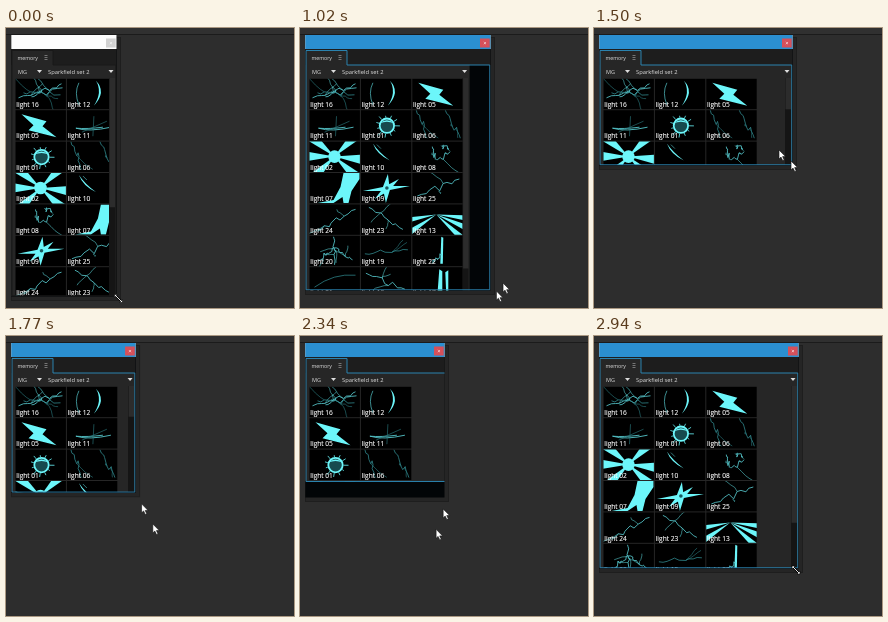
An HTML page that plays this animation: 288x280 px, repeating every 3.96 s.

```html
<!DOCTYPE html>
<html lang="en">
<head>
<meta charset="utf-8">
<title>Resizable memory panel</title>
<style>
html, body { margin: 0; width: 100%; height: 100%; overflow: hidden; background: #2d2d2d; }
svg { display: block; width: 288px; height: 280px; font-family: "Open Sans", "Noto Sans", sans-serif; }
.thumb { fill: #6cf6fa; stroke: none; }
.thumb .line { fill: none; stroke: #55c6ca; stroke-linejoin: round; }
.thumb .dim { stroke: #2d7f84; }
.thumb text { fill: #fff; stroke: #fff; stroke-width: .12; font-size: 6.6px; }
.ui text { fill: #e2e2e2; font-size: 5.8px; }
</style>
</head>
<body>
<svg viewBox="0 0 288 280">
  <defs>
    <clipPath id="windowClip"><rect id="windowBox" x="5.3" y="6"/></clipPath>
    <clipPath id="listClip"><rect id="listBox" x="6" y="38"/></clipPath>
    <clipPath id="cellClip"><rect width="50.4" height="30.4"/></clipPath>
    <path id="arrow" d="M0 0V9L2 7.1 3.7 10.6 5.2 9.9 3.6 6.6H6.5Z" fill="#fff" stroke="#111" stroke-width=".6"/>
    <g id="sizer">
      <path d="M-3-3L3 3" stroke="#000" stroke-width="2"/>
      <path d="M-4-4H-1L-4-1ZM4 4H1L4 1Z" fill="#fff" stroke="#000" stroke-width=".6"/>
      <path d="M-3-3L3 3" stroke="#fff" stroke-width=".9"/>
    </g>
  </defs>
  <rect width="288" height="280" fill="#2d2d2d"/>
  <rect width="288" height="6" fill="#303030"/>
  <rect y="6" width="288" height="1" fill="#1b1b1b"/>
  <rect id="shadow" x="5.5" y="9.5" fill="#252525" stroke="#1e1e1e"/>
  <g clip-path="url(#windowClip)">
    <rect x="5" y="7" width="283" height="273" fill="#020507"/>
    <g class="ui">
      <rect id="strip" x="5" y="21" height="16" fill="#1d1d1d"/>
      <rect id="body" x="5" y="37" fill="#262626"/>
      <rect x="6" y="22" width="41" height="15" fill="#262626"/>
      <text x="11.5" y="31.5" style="font-size:5.2px">memory</text>
      <path d="M38.5 27.5h3M38.5 29.5h3M38.5 31.5h3" stroke="#8a8a8a" stroke-width=".8"/>
      <text x="12" y="45.5" style="font-size:5.5px">MG</text>
      <path d="M31 42h5l-2.5 3Z" fill="#ddd"/>
      <text x="42" y="45.5">Sparkfield set 2</text>
      <path id="drop" d="M-2.5 42h5L0 45Z" fill="#ddd"/>
    </g>
    <g clip-path="url(#listClip)">
      <g id="cells"></g>
      <rect id="track" y="50" width="7" fill="#151515"/>
      <rect id="handle" y="50" width="6" fill="#2c2c2c"/>
    </g>
    <path id="outline" fill="none"/>
    <rect x="5" y="7" width="283" height="14" fill="#fdfdfd"/>
    <rect id="title" x="5" y="7" width="283" height="14" fill="#2b8fd0"/>
    <g id="close">
      <rect id="closeBox" x="-10" y="10.5" width="9.7" height="9"/>
      <path d="M-6.2 14l2.2 2.2m0-2.2l-2.2 2.2" stroke="#fff" stroke-width=".7" stroke-opacity=".8"/>
    </g>
  </g>
  <circle id="ring" cx="113" cy="269.5" fill="#a01818" fill-opacity=".18" stroke="#a82626"/>
  <use id="tail" href="#arrow"/>
  <use id="mouse" href="#arrow"/>
  <use id="grip" href="#sizer"/>
</svg>
<script>
const LOOP = 3960, STEP = 30, LAG = 60, REPAINT = 90;
const PITCH_X = 51.4, PITCH_Y = 31.4;
const el = id => document.getElementById(id);
const set = (id, attrs) => {
  for (const key in attrs) el(id).setAttribute(key, attrs[key]);
};
const clamp = v => Math.max(0, Math.min(1, v));

// Turning points of the pointer: time, x, y
const path = [
  [600, 113, 271], [800, 134, 270], [960, 193, 265], [1200, 220, 195],
  [1440, 201, 140], [1500, 185, 122], [1680, 130, 150], [1890, 201, 230],
  [1920, 231, 216], [2070, 248, 140], [2190, 185, 126], [2280, 147, 164],
  [2430, 128, 224], [2850, 207, 235]
];

function slope(i, axis) {
  if (i < 1 || i >= path.length - 1) return 0;
  const [a, b, c] = path.slice(i - 1, i + 2);
  const d = (b[axis] - a[axis]) / (b[0] - a[0]);
  const e = (c[axis] - b[axis]) / (c[0] - b[0]);
  return d * e > 0 ? 2 * d * e / (d + e) : 0;
}

// Monotone cubic interpolation keeps the path free of overshoot.
function pointer(t) {
  const last = path.length - 1;
  if (t <= path[0][0]) return path[0].slice(1);
  if (t >= path[last][0]) return path[last].slice(1);
  const i = path.findIndex(p => p[0] > t) - 1;
  const p = path[i], q = path[i + 1], h = q[0] - p[0], s = (t - p[0]) / h;
  return [1, 2].map(k =>
    p[k] * (1 + 2 * s) * (1 - s) ** 2 + q[k] * s * s * (3 - 2 * s) +
    h * (slope(i, k) * s * (1 - s) ** 2 - slope(i + 1, k) * s * s * (1 - s)));
}
const corner = t => pointer(t).map(v => v - 3);

const line = (d, width = .8, kind = "") =>
  `<path class="line ${kind}" stroke-width="${width}" d="${d}"/>`;
const shape = d => `<path d="${d}"/>`;

function random(seed) {
  let n = seed * 7919 + 17;
  return () => (n = (n * 16807) % 2147483647) / 2147483647;
}

// A jagged main stroke with thinner side branches.
function bolt(seed, x0, y0, x1, y1, branches = 2, kind = "") {
  const rnd = random(seed), count = 10, points = [];
  const swing = size => (rnd() - .5) * size;
  rnd();
  for (let i = 0; i <= count; i++) {
    const s = i / count, ease = Math.sin(Math.PI * s);
    points.push([x0 + (x1 - x0) * s + swing(4) * ease, y0 + (y1 - y0) * s + swing(7) * ease]);
  }
  let twigs = "";
  for (let i = 0; i < branches; i++) {
    let [x, y] = points[2 + Math.floor(rnd() * 6)];
    const dx = swing(8), dy = swing(8);
    twigs += `M${x} ${y}`;
    for (let j = 0; j < 4; j++) twigs += `L${x += dx + swing(3)} ${y += dy + swing(3)}`;
  }
  return line("M" + points.join("L"), .85, kind) + line(twigs, .6, kind);
}

function rays(cx, cy, angles, spread) {
  return angles.map(a => {
    const at = b => `${cx + 50 * Math.cos(b)} ${cy + 50 * Math.sin(b)}`;
    return shape(`M${cx} ${cy}L${at(a - spread)}L${at(a + spread)}Z`);
  }).join("");
}

function eye() {
  let lashes = "";
  for (let i = 0; i < 11; i++) {
    const a = i * Math.PI / 5.5 - 1.7, r = 10 + i * 5 % 4;
    const at = d => `${26 + d * Math.cos(a)} ${15.5 + d * Math.sin(a)}`;
    lashes += `M${at(8)}L${at(r)}`;
  }
  return line(lashes, 1) +
    '<circle cx="26" cy="15.5" r="7.2" fill="#174a4e" stroke="#6cf6fa" stroke-width="1.8"/>' +
    shape("M19 13Q26 7 33 13Q26 10 19 13Z");
}

const art = {
  "16": bolt(3, 3, 19, 47, 9) + bolt(8, 8, 14, 45, 16, 3, "dim") + bolt(5, 16, 18, 46, 5, 3),
  "12": line("M12 4Q7 14 12 26", .7) + shape("M29 2Q40 13 27 27Q36 13 29 2Z"),
  "05": shape("M6 4L31 11 27 16 41 27 13 20 18 15Z"),
  "11": line("M9 18Q22 22 44 17M9 18Q20 19 36 17", .9) + line("M27 6L26 26M15 22L40 11", .6, "dim"),
  "01": eye(),
  "06": bolt(12, 4, 0, 15, 28, 1, "dim") + bolt(14, 33, 0, 48, 28, 2, "dim"),
  "02": rays(25, 15, [.1, .75, 2.35, 3.15, 3.85, 5.5], .17) + '<circle cx="25" cy="15" r="6.3"/>',
  "10": shape("M12 2Q16 13 29 19Q18 11 12 2Z") + line("M16 3L20 7", .6),
  "08": bolt(14, 20, 5, 23, 18, 1) + bolt(12, 24, 18, 38, 10, 1) + bolt(17, 29, 4, 37, 9, 0),
  "07": shape("M8 30L24 27 31 14 34 0H50V6L42 18 39 30H34L33 24 24 30Z"),
  "09": shape("M2 18L22 14 27 1 28.5 13 49 13 29 17 25 30 22.5 18ZM14 26L23 14 38 6 29 17Z") +
    '<circle cx="26" cy="15" r="1.8" fill="#17585d"/>',
  "25": bolt(31, 5, 23, 47, 6),
  "24": bolt(41, 8, 27, 46, 5),
  "23": bolt(51, 8, 3, 42, 25, 3),
  "13": rays(24, 10, [.12, .42, .75, 2.55, 2.95], .09),
  "20": bolt(61, 24, 1, 25, 29, 4) + bolt(63, 25, 12, 43, 24, 1) + bolt(64, 25, 12, 9, 25, 1),
  "19": bolt(71, 4, 18, 47, 14, 2, "dim"),
  "22": shape("M29 1L31 2 30.5 28H28Z") + bolt(81, 29, 18, 20, 27, 0),
  "21": line("M5 20Q24 6 46 8", .8, "dim"),
  "18": bolt(91, 5, 6, 44, 22, 3),
  "17": shape("M27 2L30 4V29H25ZM33 5L36 3V29H34Z"),
  "15": bolt(95, 8, 5, 42, 23),
  "14": bolt(97, 5, 22, 44, 5),
  "04": bolt(99, 24, 2, 30, 28)
};
const order = ["16", "12", "05", "11", "01", "06", "02", "10", "08", "07", "09", "25",
  "24", "23", "13", "20", "19", "22", "21", "18", "17", "15", "14", "04"];

el("cells").innerHTML = order.map(name =>
  `<g class="thumb"><rect width="50.4" height="30.4" fill="#000"/>
   <g clip-path="url(#cellClip)">${art[name]}</g><text x=".8" y="28.3">light ${name}</text></g>`).join("");
const cells = [...el("cells").children];

function layoutList(right, bottom) {
  const columns = Math.max(2, Math.floor((right - 15) / PITCH_X));
  cells.forEach((cell, i) => {
    const x = 9.5 + i % columns * PITCH_X;
    const y = 50.8 + Math.floor(i / columns) * PITCH_Y;
    cell.setAttribute("transform", `translate(${x} ${y})`);
  });
  const view = Math.max(1, bottom - 50);
  const total = Math.ceil(cells.length / columns) * PITCH_Y - 9;
  set("body", { width: right - 5, height: bottom - 37 });
  set("listBox", { width: right - 7, height: bottom - 38 });
  set("track", { x: right - 7, height: view });
  set("handle", { x: right - 6.5, height: Math.min(view, view * view / total) });
  set("drop", { transform: `translate(${right - 5} 0)` });
}

function render(time) {
  const t = Math.floor(time / STEP) * STEP;
  const active = clamp((t - 270) / 150);
  const late = t - LAG, beat = late / REPAINT;
  const [right, bottom] = corner(late);
  // The frame repaints less often than the window, and the list after the frame.
  const [frameRight, frameBottom] = corner(Math.min(late, Math.round(beat) * REPAINT));

  set("windowBox", { width: right - 4.8, height: bottom - 5.5 });
  set("shadow", { width: right - 1, height: bottom - 5 });
  layoutList(...corner(Math.floor(beat) * REPAINT));
  set("strip", { width: frameRight - 5 });
  set("outline", {
    d: `M6 22.5H47V37H${frameRight - .2}V${frameBottom - .2}H6Z`,
    stroke: active > .5 ? "#2a82ae" : "#191919"
  });
  set("title", { opacity: active });
  set("close", { transform: `translate(${right} 0)` });
  set("closeBox", { fill: active > .5 ? "#d6505a" : "#d2d2d2" });

  set("ring", {
    r: 4 + 3.5 * clamp((t - 420) / 120),
    opacity: t >= 420 ? 1 - clamp((t - 600) / 120) : 0
  });

  const moving = t >= 660 && t < 2880;
  const place = ([x, y], shown) => ({
    transform: `translate(${x} ${y})`, visibility: shown ? "visible" : "hidden"
  });
  set("mouse", place(pointer(t), moving));
  set("tail", place(pointer(t - 40), moving));
  set("grip", place(t < 1500 ? [112.5, 270.5] : [202, 234], !moving));
}

const start = performance.now();
function tick() {
  render((performance.now() - start) % LOOP);
  requestAnimationFrame(tick);
}
tick();
</script>
</body>
</html>
```
